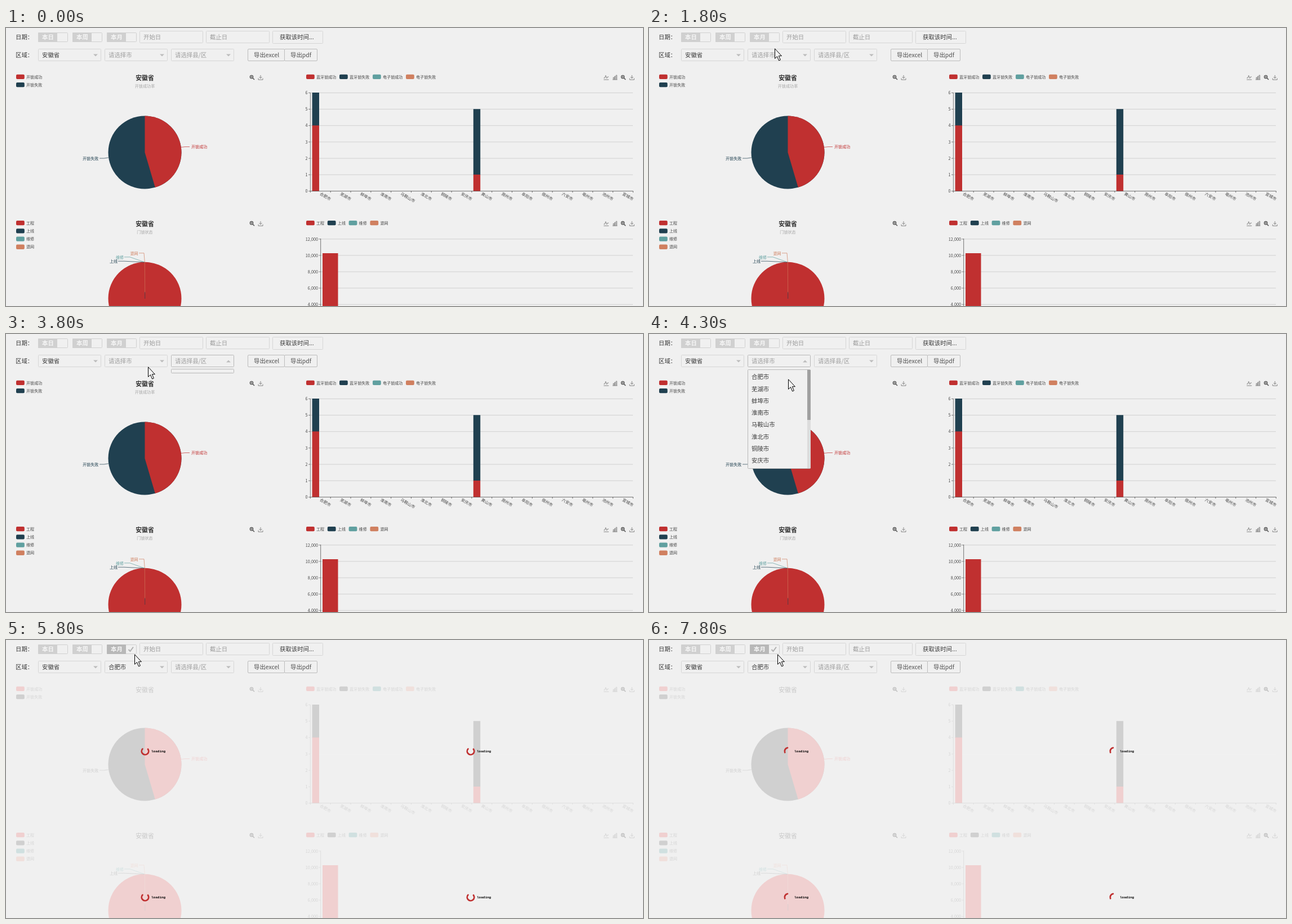
An HTML page for the animation above (8 s loop, 1131x495 px).

```html
<!DOCTYPE html>
<html lang="zh-CN">
<head>
<meta charset="utf-8">
<title>开锁统计</title>
<style>
  html, body { margin: 0; width: 100%; height: 100%; overflow: hidden; background: #f0f0f0; }
  svg { display: block; font-family: "Noto Sans CJK SC", "Noto Sans CJK", sans-serif; }
  #charts {
    --red: #c03030; --navy: #204050; --teal: #60a0a0; --orange: #d08060;
    --text: #484848; --title: #303030; --sub: #a8a8a8; --axis: #505050;
    --grid: #d0d0d0; --icon: #787878; --zoom: #585858; --weight: 700;
  }
  #charts.faded {
    --red: #f0d0d0; --navy: #d0d0d0; --teal: #d0e0e0; --orange: #f0e0dc;
    --text: #d6d6d6; --title: #c8c8c8; --sub: #f0f0f0; --axis: #dadada;
    --grid: #f0f0f0; --icon: #d2d2d2; --zoom: #c0c0c0; --weight: 400;
  }
  .load { font: bold 6px "Liberation Mono", monospace; }
</style>
</head>
<body>
<svg id="stage" width="1131" height="495" viewBox="0 0 1131 495">
  <g id="form"></g>
  <g id="charts"></g>
  <g id="loading"></g>
  <g id="popups"></g>
  <path id="cursor" d="M.5 .8V18.3L4.5 14.6L7.6 22L10.4 20.8L7.4 13.7H12.4Z" fill="#f4f4f4" stroke="#000"/>
</svg>
<script>
const NS = 'http://www.w3.org/2000/svg';
const $ = id => document.getElementById(id);
const RED = 'var(--red)', NAVY = 'var(--navy)', TEAL = 'var(--teal)', ORANGE = 'var(--orange)';
const TEXT = 'var(--text)', AXIS = 'var(--axis)', GRID = 'var(--grid)', ICON = 'var(--icon)';
const BG = '#f0f0f0', DARK = '#383838', HINT = '#9c9c9c', EDGE = '#d6d6d6', OPEN = '#b8b8b8';
const COLORS = [RED, NAVY, TEAL, ORANGE];
const CITIES = '合肥 芜湖 蚌埠 淮南 马鞍山 淮北 铜陵 安庆 黄山 滁州 阜阳 宿州 六安 亳州 池州 宣城'
  .split(' ').map(name => name + '市');

function add(parent, tag, attrs, content = '') {
  const el = document.createElementNS(NS, tag);
  for (const key in attrs) el.setAttribute(key, attrs[key]);
  el.textContent = content;
  parent.append(el);
  return el;
}
const group = parent => add(parent, 'g', {});
const rect = (p, x, y, width, height, fill, rx = 0) =>
  add(p, 'rect', { x, y, width, height, fill, rx });
const frame = (p, x, y, w, h, stroke = EDGE, rx = 1) =>
  add(p, 'rect', { x: x + .5, y: y + .5, width: w - 1, height: h - 1, rx, fill: BG, stroke });
const line = (p, d, stroke, width = 1) =>
  add(p, 'path', { d, stroke, fill: 'none', 'stroke-width': width });
// y is the middle of the glyphs
const label = (p, x, y, str, size, fill, more = {}) =>
  add(p, 'text', { x, y: y + size * .375, 'font-size': size, fill, ...more }, str);

// ---- form ----
const form = $('form');

function toggle(x, name) {
  const g = group(form);
  frame(g, x, 8, 53, 17, '#d0d0d0');
  const face = rect(g, x, 8, 34, 17, '#d0d0d0', 1);
  label(g, x + 7, 16.5, name, 10.4, '#f6f6f6', { 'font-weight': 700 });
  const mark = line(g, `M${x + 38.5} 17L${x + 41.5} 20L${x + 47} 12.5`, '#b0b0b0', 2);
  return on => {
    face.setAttribute('fill', on ? '#b8b8b8' : '#d0d0d0');
    mark.style.display = on ? '' : 'none';
  };
}

function select(x, hint) {
  const box = frame(form, x, 37, 112, 22);
  const str = label(form, x + 7, 48, hint, 10.4, HINT);
  const arrow = add(form, 'path', { fill: '#bcbcbc' });
  return (value, open) => {
    str.textContent = value || hint;
    str.setAttribute('fill', value ? DARK : HINT);
    box.setAttribute('stroke', open ? OPEN : EDGE);
    arrow.setAttribute('d', open ? `M${x + 98} 50.5h8l-4 -4z` : `M${x + 98} 46.5h8l-4 4z`);
  };
}

label(form, 17, 16, '日期：', 10.4, DARK);
label(form, 17, 48, '区域：', 10.4, DARK);
const [setDay, setWeek, setMonth] = ['本日', '本周', '本月'].map((name, i) => toggle(57 + 61 * i, name));
setDay(false);
setWeek(false);
for (const [x, hint] of [[237, '开始日'], [355, '截止日']]) {
  frame(form, x, 5, 113, 22);
  label(form, x + 7, 16, hint, 10.4, HINT);
}
frame(form, 473, 5, 90, 23);
label(form, 486, 16, '获取该时间...', 10.4, DARK);
const setProvince = select(57, '请选择省');
const setCity = select(175, '请选择市');
const setCounty = select(293, '请选择县/区');
setProvince('安徽省', false);
for (const [x, w, name] of [[429, 66, '导出excel'], [494, 59, '导出pdf']]) {
  frame(form, x, 37, w, 22, '#bcbcbc', 1.5);
  label(form, x + 11, 48, name, 10.4, '#505050');
}

// ---- popups ----
const countyList = group($('popups'));
frame(countyList, 293, 62, 112, 8, OPEN);

const cityList = group($('popups'));
frame(cityList, 175, 63, 112, 177, OPEN);
CITIES.slice(0, 8).forEach((name, i) => label(cityList, 182, 76.5 + 21.25 * i, name, 10.4, DARK));
rect(cityList, 281, 64, 6, 175, '#dcdcdc');
rect(cityList, 281, 64, 6, 89, '#a0a0a0');

// ---- charts ----
const charts = $('charts');

const icons = {
  trend: (x, y) => line(charts, `M${x - 4.5} ${y + 4}h9M${x - 4.5} ${y + 1}h2l1.5 -4.5l2 5l1.3 -2.5h2`, ICON, .9),
  bars: (x, y) => line(charts, `M${x - 4} ${y + 4}h8.5M${x - 2.8} ${y + 4}v-4h1.6v4M${x - .4} ${y + 4}v-6h1.6v6M${x + 2.2} ${y + 4}v-8h1.6v8`, ICON, .8),
  zoom: (x, y) => {
    add(charts, 'circle', { cx: x - 1, cy: y - 1, r: 2.7, fill: 'none', stroke: 'var(--zoom)', 'stroke-width': 1.3 });
    line(charts, `M${x - 2.5} ${y - 1}h3M${x - 1} ${y - 2.5}v3`, 'var(--zoom)', 1);
    line(charts, `M${x + 1} ${y + 1}L${x + 4} ${y + 4}`, 'var(--zoom)', 1.6);
  },
  save: (x, y) => line(charts, `M${x - 4} ${y + 1.5}v2.6h8v-2.6M${x} ${y - 4}v5.5M${x - 2.5} ${y - 1}l2.5 2.5l2.5 -2.5`, ICON, .9)
};

function key(x, y, name, color) {
  rect(charts, x, y - 4.2, 14.8, 8.3, color, 2);
  label(charts, x + 18, y, name, 7.1, TEXT);
}

function pieHead(y, sub, names) {
  names.forEach((name, i) => key(18, y - 1 + 14.2 * i, name, COLORS[i]));
  label(charts, 246.5, y + .5, '安徽省', 10.8, 'var(--title)',
    { 'text-anchor': 'middle', style: 'font-weight:var(--weight)' });
  label(charts, 246.5, y + 15, sub, 7.1, 'var(--sub)', { 'text-anchor': 'middle' });
  icons.zoom(437, y);
  icons.save(452, y);
}

function barHead(y, step, names) {
  names.forEach((name, i) => key(533 + step * i, y - 1, name, COLORS[i]));
  ['trend', 'bars', 'zoom', 'save'].forEach((name, i) => icons[name](1065.7 + 15.2 * i, y));
}

function callout(x, y, name, color, d) {
  line(charts, d, color, .7);
  label(charts, x, y, name, 7.1, color);
}

function valueAxis(x, top, step, names) {
  names.forEach((name, i) => {
    const y = top + step * i;
    line(charts, `M${x} ${y}H1113`, GRID);
    line(charts, `M${x - 3} ${y}h3`, AXIS, .7);
    label(charts, x - 4.5, y, name, 7.3, TEXT, { 'text-anchor': 'end' });
  });
}

pieHead(88, '开锁成功率', ['开锁成功', '开锁失败']);
const PX = 246.5, PY = 221.5, PR = 65, share = 2 * Math.PI * 5 / 11;
add(charts, 'circle', { cx: PX, cy: PY, r: PR, fill: NAVY });
add(charts, 'path', {
  d: `M${PX} ${PY}v${-PR}A${PR} ${PR} 0 0 1 ${PX + PR * Math.sin(share)} ${PY - PR * Math.cos(share)}Z`,
  fill: RED
});
callout(329, 211.5, '开锁成功', RED, 'M310.8 212.4L318 211.5H326');
callout(136, 232, '开锁失败', NAVY, 'M182 230.8L174 232H166');

pieHead(348.2, '门锁状态', ['工程', '上线', '维修', '退网']);
add(charts, 'circle', { cx: PX, cy: 481.7, r: PR, fill: RED });
line(charts, 'M246.3 417L246.7 472', ORANGE, .6);
line(charts, 'M246.7 470V482', NAVY, .6);
callout(184, 415.5, '上线', NAVY, 'M246 417L210 415.2H199');
callout(195, 408, '维修', TEAL, 'M246 417L220 407.8H210');
callout(220.5, 401, '退网', ORANGE, 'M246.3 417L245 400.8H236');

barHead(88, 59, ['蓝牙锁成功', '蓝牙锁失败', '电子锁成功', '电子锁失败']);
valueAxis(540, 115.4, 29.17, [6, 5, 4, 3, 2, 1, 0]);
const SLOT = 573 / 16;
rect(charts, 543.6, 115, 12.4, 59, NAVY);
rect(charts, 543.6, 173.5, 12.4, 117, RED);
rect(charts, 829.8, 144.3, 12.4, 117, NAVY);
rect(charts, 829.8, 261, 12.4, 29.5, RED);
line(charts, 'M540.4 115V290.4H1113', AXIS, .7);
for (let i = 0; i <= 16; i++) line(charts, `M${540.4 + SLOT * i} 290v3`, AXIS, .8);
CITIES.forEach((name, i) => {
  const x = 540 + SLOT * (i + .5);
  label(charts, x, 294.5, name, 7.1, TEXT, { transform: `rotate(30 ${x} 294.5)` });
});

barHead(348.2, 37.8, ['工程', '上线', '维修', '退网']);
valueAxis(558.6, 375.8, 29.1, ['12,000', '10,000', '8,000', '6,000', '4,000']);
rect(charts, 562, 401, 27.5, 94, RED);
line(charts, 'M558.7 375V495', AXIS, .8);

// ---- loading spinners ----
const loading = $('loading');
const spinners = [[247, 198], [825, 198], [247, 458], [825, 458]].map(([x, y]) => {
  label(loading, x + 11, y, 'loading', 6, '#000', { class: 'load' });
  return add(loading, 'path', {
    transform: `translate(${x} ${y})`, fill: 'none', stroke: '#c03030',
    'stroke-width': 2.8, 'stroke-linecap': 'round'
  });
});

const circInOut = k => k < .5
  ? (1 - Math.sqrt(1 - 4 * k * k)) / 2
  : (1 + Math.sqrt(1 - (2 * k - 2) ** 2)) / 2;

// The tail follows the head with a lag of 0.3 of the cycle.
function arcPath(phase) {
  const full = 2 * Math.PI, r = 6.2;
  const head = .1 + (full - .1) * circInOut(phase % 1);
  const tail = phase < .3 ? 0 : full * circInOut((phase - .3) % 1);
  const span = (head - tail + full) % full;
  const at = a => `${r * Math.sin(a)} ${-r * Math.cos(a)}`;
  return `M${at(tail)}A${r} ${r} 0 ${span > Math.PI ? 1 : 0} 1 ${at(tail + span)}`;
}

// ---- timeline: one state per half second, first change at 300 ms ----
const LOOP = 8000;
const POINTER = [
  null, [625, 344], [364, 98], [247, 94], [223, 36], [217, 12], [323, 66],
  [387, 43], [252, 58], [247, 80], [246, 78], [236, 51], [228, 25]
];
const COUNTY_OPEN = 8, CITY_OPEN = 9, LOADING = 10, MONTH_ON = 12;
const show = (el, on) => { el.style.display = on ? '' : 'none'; };
let shown = -1;

function render(step) {
  const pos = POINTER[Math.min(step, POINTER.length - 1)];
  show($('cursor'), pos);
  if (pos) $('cursor').setAttribute('transform', `translate(${pos})`);
  const busy = step >= LOADING;
  setMonth(step >= MONTH_ON);
  setCity(busy ? '合肥市' : '', step === CITY_OPEN);
  setCounty('', step === COUNTY_OPEN);
  show(cityList, step === CITY_OPEN);
  show(countyList, step === COUNTY_OPEN);
  charts.classList.toggle('faded', busy);
  show(loading, busy);
  if (busy) {
    const d = arcPath(.067 + .295 * (step - LOADING));
    spinners.forEach(el => el.setAttribute('d', d));
  }
}

function tick() {
  const step = Math.floor((performance.now() % LOOP + 200) / 500);
  if (step !== shown) render(shown = step);
  requestAnimationFrame(tick);
}
tick();
</script>
</body>
</html>
```
